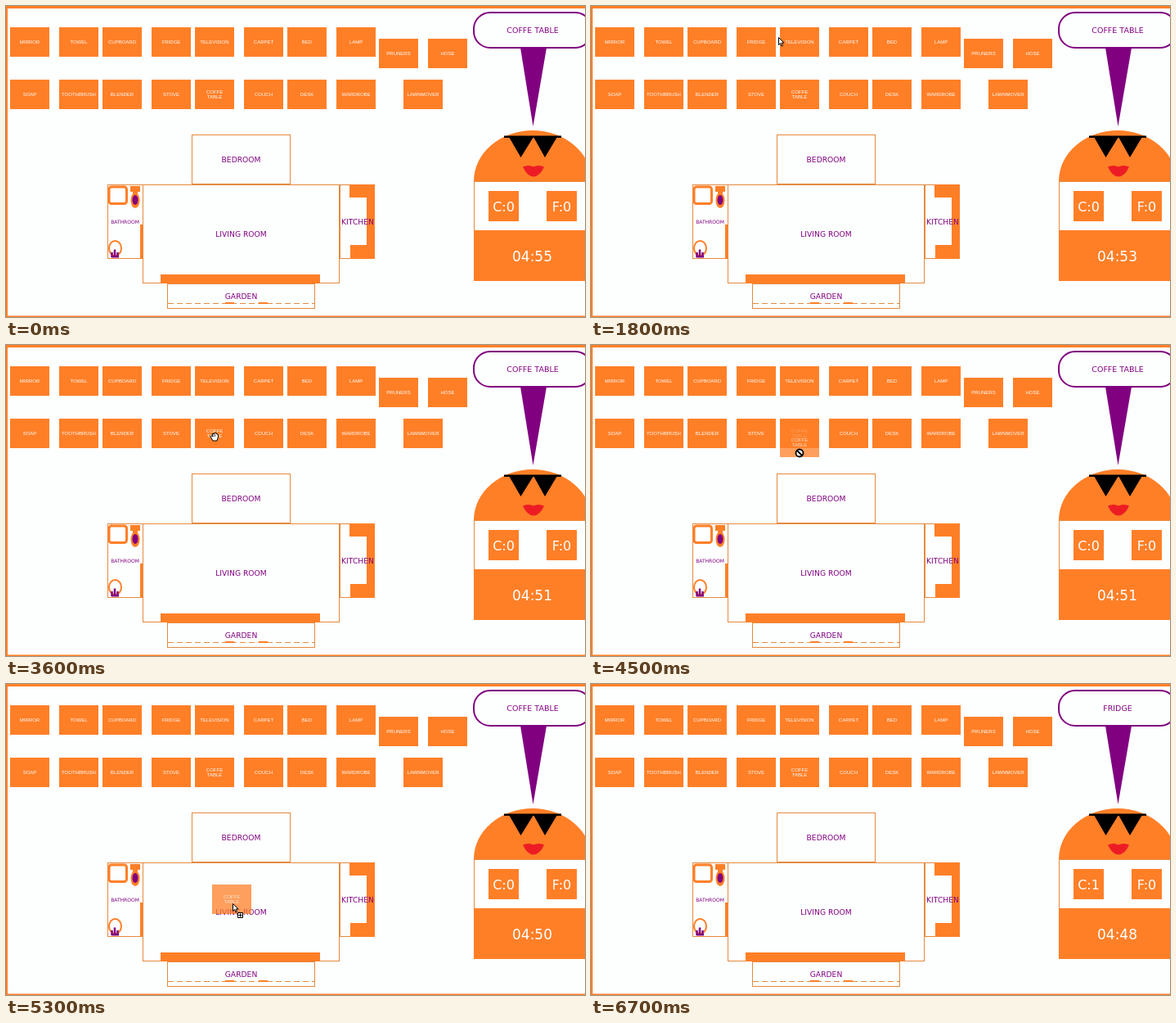
An HTML page with a canvas that plays this animation: 708x380 px, repeating every 6.9 s.

```html
<!DOCTYPE html>
<html lang="en">
<head>
<meta charset="utf-8">
<title>Furniture game</title>
<style>
html, body { margin: 0; width: 100%; height: 100%; overflow: hidden; background: #fdfefe; }
canvas { display: block; }
</style>
</head>
<body>
<canvas id="stage" width="708" height="380"></canvas>
<script>
const ctx = document.getElementById('stage').getContext('2d');
const LOOP = 6900, STEP = 100;
const ORANGE = '#ff7f27', LINE = '#e58a3f', PURPLE = '#800080', PAPER = '#fdfefe';
const HAND_FONT = '"DejaVu Sans", sans-serif';
const LABEL_FONT = '"Liberation Sans", Arial, sans-serif';

const COLUMNS = [5, 65, 118, 178, 231, 291, 344, 404];
const ROWS = [
  ['MIRROR', 'TOWEL', 'CUPBOARD', 'FRIDGE', 'TELEVISION', 'CARPET', 'BED', 'LAMP'],
  ['SOAP', 'TOOTHBRUSH', 'BLENDER', 'STOVE', 'COFFE TABLE', 'COUCH', 'DESK', 'WARDROBE']
];
const TICKS = [700, 1700, 2700, 3600, 4700, 5600, 6700];

// Rows of [time, x, y].
const POINTER = [
  [1500, 262, 120], [1800, 229, 38], [2000, 225, 32], [2200, 229, 36], [2500, 229, 36],
  [2900, 241, 94], [3100, 253, 108], [3600, 255, 112], [4300, 255, 113],
  [4500, 255, 132], [5000, 268, 230], [5300, 277, 268], [5500, 279, 274]
];
const DRAGGED = [[4300, 231, 90], [4500, 231, 101], [5000, 242, 188], [5300, 252, 245], [5500, 255, 251]];
const GRAB = 4300, DROP = 5500, LEAVE = 5900;

function along(keys, t) {
  const i = keys.findIndex(k => k[0] > t);
  if (i < 0) return keys[keys.length - 1].slice(1);
  const a = keys[Math.max(0, i - 1)], b = keys[i];
  const p = i ? (t - a[0]) / (b[0] - a[0]) : 0;
  return [a[1] + (b[1] - a[1]) * p, a[2] + (b[2] - a[2]) * p].map(Math.round);
}

function text(str, x, y, size, color = PURPLE, font = HAND_FONT) {
  ctx.font = `${size}px ${font}`;
  ctx.textAlign = 'center';
  ctx.fillStyle = color;
  ctx.fillText(str, x, y + size * 0.36);
}

function box(x, y, w, h, color = ORANGE) {
  ctx.fillStyle = color;
  ctx.fillRect(x, y, w, h);
}

function frame(x, y, w, h) {
  ctx.strokeStyle = LINE;
  ctx.lineWidth = 1;
  ctx.strokeRect(x + 0.5, y + 0.5, w, h);
}

function poly(color, ...points) {
  ctx.beginPath();
  for (let i = 0; i < points.length; i += 2) ctx.lineTo(points[i], points[i + 1]);
  ctx.closePath();
  ctx.fillStyle = color;
  ctx.fill();
}

function line(color, width, x1, y1, x2, y2) {
  ctx.strokeStyle = color;
  ctx.lineWidth = width;
  ctx.beginPath();
  ctx.moveTo(x1, y1);
  ctx.lineTo(x2, y2);
  ctx.stroke();
}

function oval(x, y, rx, ry) {
  ctx.beginPath();
  ctx.ellipse(x, y, rx, ry, 0, 0, 7);
}

function item(name, x, y) {
  box(x, y, 48, 36);
  const words = name.split(' ');
  words.forEach((word, i) =>
    text(word, x + 24, y + 18 + (i - (words.length - 1) / 2) * 6.5, 6, '#fff', LABEL_FONT));
}

function drawItems() {
  ROWS.forEach((row, r) => row.forEach((name, c) => item(name, COLUMNS[c], 26 + r * 64)));
  item('PRUNERS', 456, 40);
  item('HOSE', 516, 40);
  item('LAWNMOVER', 486, 90);
}

function drawBathroom() {
  frame(124, 218, 43, 90);
  box(164, 267, 4, 42);
  ctx.strokeStyle = ORANGE;
  ctx.lineWidth = 3;
  ctx.beginPath();
  ctx.roundRect(126, 221, 21.5, 20.5, 3);
  ctx.stroke();
  box(152, 220, 12, 7);
  box(155, 226, 6, 4);
  oval(158, 237.5, 5.5, 9.5);
  ctx.fill();
  oval(158, 237, 3.5, 6);
  ctx.fillStyle = PURPLE;
  ctx.fill();
  oval(133.5, 296, 7.5, 9);
  ctx.strokeStyle = ORANGE;
  ctx.lineWidth = 2;
  ctx.stroke();
  [[129.5, 301], [133, 297.5], [136.5, 301]].forEach(([x, y]) => line(PURPLE, 2.5, x, y, x, 307));
  box(129, 305, 9, 2.5, PURPLE);
  text('BATHROOM', 145.5, 264, 6);
}

function drawHouse() {
  frame(227, 157, 120, 60);
  text('BEDROOM', 287.5, 188, 9.2);
  drawBathroom();
  frame(408, 218, 42, 90);
  poly(ORANGE, 420, 218, 451, 218, 451, 309, 421, 309, 421, 292, 441, 292, 441, 234, 420, 234);
  text('KITCHEN', 430, 264, 9.2);
  frame(167, 218, 240, 120);
  box(189, 328, 195, 11);
  text('LIVING ROOM', 287.5, 279, 9.2);
  frame(197, 339, 180, 30);
  ctx.setLineDash([7, 4]);
  line(LINE, 1, 198, 363.5, 377, 363.5);
  ctx.setLineDash([]);
  box(268, 362, 11, 2);
  box(309, 362, 11, 2);
  text('GARDEN', 287.5, 355, 9.2);
}

function drawRobot(wanted, correct, clock) {
  ctx.strokeStyle = PURPLE;
  ctx.lineWidth = 2;
  ctx.beginPath();
  ctx.roundRect(572, 8, 144, 43, 20);
  ctx.stroke();
  poly(PURPLE, 629, 51, 661, 51, 644.5, 147);
  text(wanted, 644, 30, 9.5);

  ctx.beginPath();
  ctx.ellipse(644, 214, 72, 62, 0, Math.PI, 0);
  ctx.fillStyle = ORANGE;
  ctx.fill();
  box(609, 158.5, 70, 2.5, '#000');
  poly('#000', 615, 160, 645, 160, 629.5, 185);
  poly('#000', 645, 160, 674, 160, 659, 185);
  ctx.beginPath();
  ctx.moveTo(632, 196.5);
  ctx.quadraticCurveTo(639, 193.5, 645, 196.5);
  ctx.quadraticCurveTo(651, 193.5, 658, 196.5);
  ctx.quadraticCurveTo(653, 208, 645, 208.5);
  ctx.quadraticCurveTo(637, 208, 632, 196.5);
  ctx.fillStyle = '#ed1c24';
  ctx.fill();

  frame(572, 214, 144, 60);
  box(590, 226, 37, 37);
  box(661, 226, 37, 37);
  text('C:' + correct, 608.5, 245, 16, '#fff');
  text('F:0', 679.5, 245, 16, '#fff');
  box(572, 274, 144, 62);
  text(clock, 643.5, 306, 17, '#fff');
}

function outlined(path) {
  ctx.fillStyle = '#fff';
  ctx.strokeStyle = '#000';
  ctx.lineWidth = 1;
  const shape = new Path2D(path);
  ctx.fill(shape);
  ctx.stroke(shape);
}

function drawPointer(kind, x, y) {
  ctx.save();
  ctx.translate(x, y);
  if (kind === 'hand') {
    outlined('M-2 5L-5 0Q-4 -2 -2 0L-3 -3Q-2 -5 -1 -3Q0 -6 1 -4Q3 -5 3 -3Q5 -3 4.500 0L3 5Z');
    line('#000', 0.6, -1, -3, -0.5, 0);
    line('#000', 0.6, 1, -3, 1, 0);
  } else if (kind === 'blocked') {
    oval(0, 0, 4.5, 4.5);
    ctx.fillStyle = '#fff';
    ctx.fill();
    ctx.strokeStyle = '#000';
    ctx.lineWidth = 1.8;
    ctx.stroke();
    line('#000', 1.8, -3, -3, 3, 3);
  } else {
    outlined('M.5 .5V9.500L2.500 7.500L4 11L5.500 10.300L4 7H7Z');
    if (kind === 'copy') {
      outlined('M6.500 11.500h6v6h-6Z');
      line('#000', 1, 7.5, 14.5, 11.5, 14.5);
      line('#000', 1, 9.5, 12.5, 9.5, 16.5);
    }
  }
  ctx.restore();
}

function pointerKind(t, y) {
  if (t < 2700 || t >= DROP) return 'arrow';
  if (t <= GRAB) return 'hand';
  return y < 157 ? 'blocked' : 'copy';
}

function draw(t) {
  const dropped = t >= DROP;
  const seconds = 55 - TICKS.filter(tick => tick <= t).length;
  box(0, 0, 708, 380, PAPER);
  box(0, 0, 708, 3);
  box(0, 0, 2, 380);
  box(0, 378.5, 708, 1.5);
  drawItems();
  drawHouse();
  drawRobot(dropped ? 'FRIDGE' : 'COFFE TABLE', dropped ? 1 : 0, '04:' + seconds);

  if (t > GRAB && !dropped) {
    ctx.globalAlpha = 0.75;
    item('COFFE TABLE', ...along(DRAGGED, t));
    ctx.globalAlpha = 1;
  }
  if (t >= POINTER[0][0] && t < LEAVE) {
    const [x, y] = along(POINTER, t);
    drawPointer(pointerKind(t, y), x, y);
  }
}

const start = performance.now();
function tick() {
  const t = (performance.now() - start) % LOOP;
  draw(Math.floor(t / STEP) * STEP);
  requestAnimationFrame(tick);
}
tick();
</script>
</body>
</html>
```
